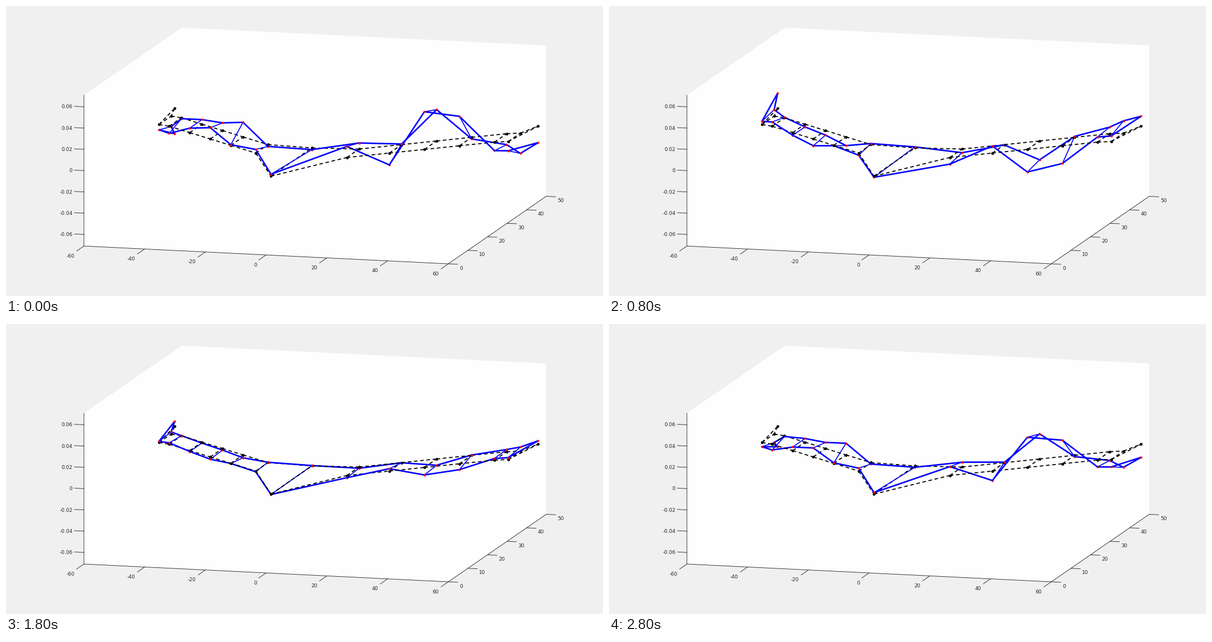
A matplotlib script that plays this animation: 1073x522 px, repeating every 3 s.

```python
import numpy as np
import matplotlib.pyplot as plt
from matplotlib.animation import FuncAnimation

W, H, DPI = 1073, 522, 64
PX = 72 / DPI  # points per pixel
FRAMES, STEP = 15, 200
RISE = 5  # frames from lowest to highest pose
ZMAX = 0.0709
INK = "#262626"
plt.rcParams["font.family"] = "DejaVu Sans"

# Mode shape along each rail, left tip to right tip, in thousandths
FRONT_MODE = [5, 6.7, -4.2, -10.6, -0.6, -3.4, -1.8,
              -10.4, 11.1, -35.4, -27.7, 8, 8.7]
BACK_MODE = [23.9, 9.9, 0.8, -4.3, -7.2, -13.7, 1.7, 1.6,
             -5.7, -0.6, -29.5, 1.5, 10.3, 19.1, 15.5]


def project(x, y, z=0):
    """Orthographic view of the data box, in pixels from the top left."""
    return (467.5 + 5.458 * x + 3.52 * y,
            312.3 + 0.2667 * x - 2.43 * y - 1915 * z)


def wing():
    """Plan view of a swept, mirrored wing: front rail, back rail with tips."""
    half = np.array([15, *np.linspace(26.1, 53.55, 4), 57.5])
    sweep = 17.95 + 0.405 * (np.minimum(half, 55.7) - 15)
    span = np.concatenate([-half[::-1], [0], half])
    front = np.concatenate([sweep[::-1], [2.5], sweep])
    back = np.concatenate([sweep[::-1] + 6.25, [23.4], sweep + 6.25])
    tip_x, tip_y = 59.85, 46.1
    return (np.concatenate([span, [-tip_x], span, [tip_x]]),
            np.concatenate([front, [tip_y], back, [tip_y]]))


X, Y = wing()
MODE = np.array(FRONT_MODE + BACK_MODE) / 1000
NF, N = len(FRONT_MODE), len(MODE)
SX, REST = project(X, Y)

RAILS = [(i, i + 1) for i in range(N - 1) if i != NF - 1]
RAILS += [(0, NF), (NF - 1, N - 1)]
RUNGS = [(i, NF + 1 + i) for i in range(NF)]
BARS = RAILS + RUNGS

fig = plt.figure(figsize=(W / DPI, H / DPI), dpi=DPI, facecolor="#f0f0f0")
ax = fig.add_axes([0, 0, 1, 1])
ax.set_xlim(0, W)
ax.set_ylim(H, 0)
ax.axis("off")


def line(xs, ys, width, color, **kw):
    return ax.plot(xs, ys, lw=width * PX, color=color, **kw)[0]


def dot(x, y, size, color, **kw):
    return ax.plot([x], [y], "o", ms=size * PX, mfc=color, mec="none", **kw)[0]


def tick(point, step, gap, label, ha):
    x, y = project(*point)
    line([x, x + step[0]], [y, y + step[1]], 0.9, INK, zorder=0.5)
    ax.text(x + gap[0], y + gap[1], label, fontsize=9 * PX, color=INK,
            ha=ha, va="center_baseline")


def draw_box():
    top, low = ZMAX, -ZMAX
    left, near, right = (-60, 0, low), (60, 0, low), (60, 50, low)
    outline = [(-60, 50, top), (60, 50, top), right, near, left, (-60, 0, top)]
    ax.fill(*zip(*(project(*p) for p in outline)),
            color="#fefefe", lw=0, zorder=0)
    line(*zip(*(project(*p) for p in [(-60, 0, top), left, near, right])),
         0.9, INK, zorder=0.5)
    for x in range(-60, 61, 20):
        tick((x, 0, low), (-13, 9), (-16.8, 17), str(x), "right")
    for y in range(0, 51, 10):
        tick((60, y, low), (17, 0.8), (20, 7), str(y), "left")
    for i in range(-3, 4):
        z = 0.02 * i
        tick((-60, 0, z), (-17, -0.8), (-20.5, -0.4),
             f"{z:.2f}" if i else "0", "right")


draw_box()

DASH = 1.8
for a, b in BARS:
    line([SX[a], SX[b]], [REST[a], REST[b]], DASH, "black", zorder=2,
         ls=(0, (6.5 / DASH, 4.7 / DASH)), dash_capstyle="butt")
for x, y in zip(SX, REST):
    dot(x, y, 5, "black", zorder=2.5)

bars = [line([SX[a], SX[b]], [0, 0], 2.7 if n < len(RAILS) else 1.7, "blue",
             solid_capstyle="round")
        for n, (a, b) in enumerate(BARS)]
dots = [dot(x, y, 4, "red") for x, y in zip(SX, REST)]


def phase(i):
    """Linear swing from -1 up to 1, then back at half the speed."""
    if i <= RISE:
        return -1 + 2 * i / RISE
    return 1 - 2 * (i - RISE) / (FRAMES - RISE)


def update(i):
    lift = phase(i) * MODE
    _, ys = project(X, Y, lift)
    # Raised parts lie nearer to the viewer than the rest shape
    for bar, (a, b) in zip(bars, BARS):
        bar.set_ydata([ys[a], ys[b]])
        bar.set_zorder(3 if lift[a] + lift[b] > 0 else 1)
    for mark, y, up in zip(dots, ys, lift):
        mark.set_ydata([y])
        mark.set_zorder(3.5 if up > 0 else 1.5)
    return bars + dots


anim = FuncAnimation(fig, update, frames=FRAMES, interval=STEP, repeat=True,
                     repeat_delay=0, blit=False)
plt.show()
```
